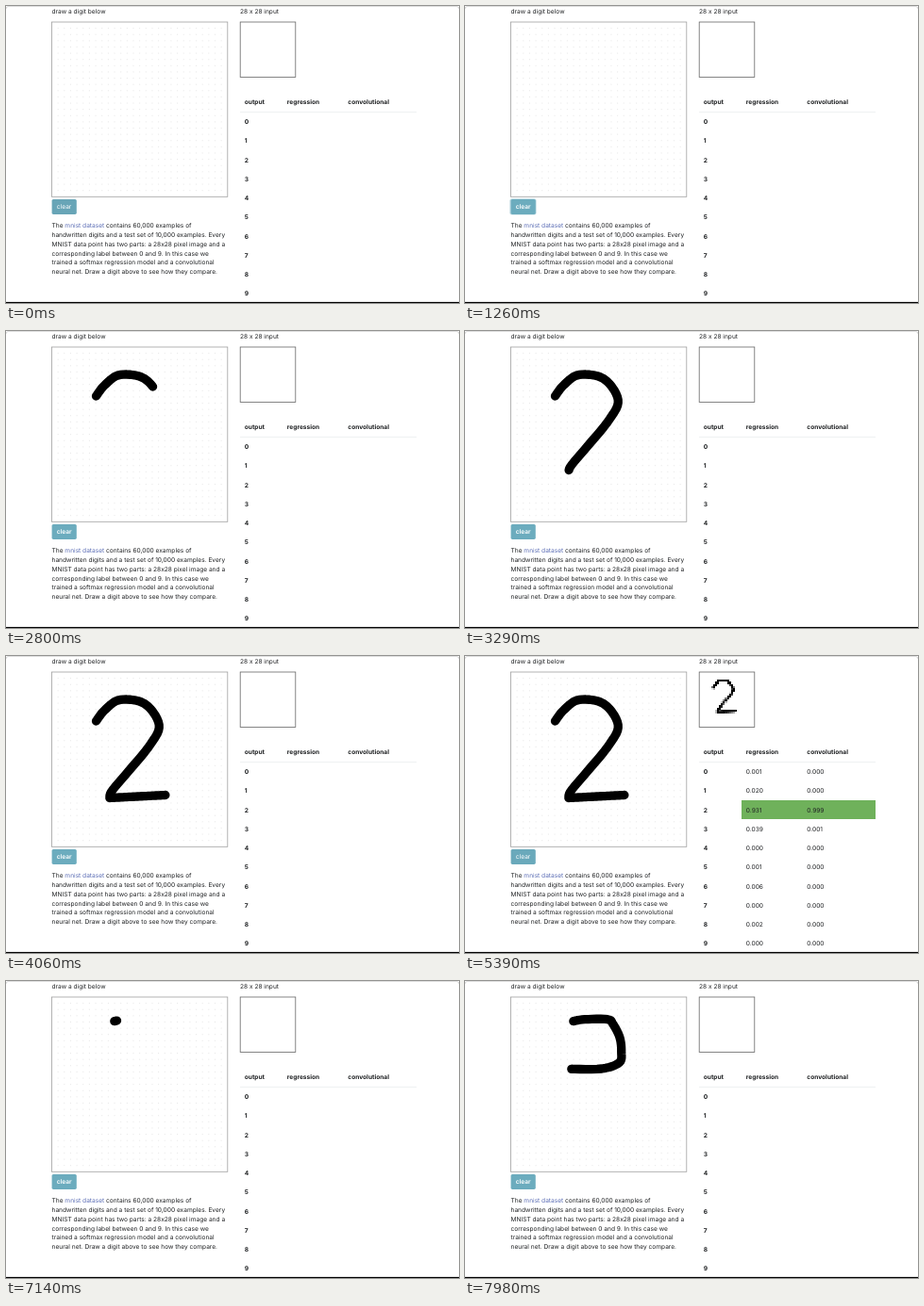
Recreate the animation shown at these times as an HTML page. Size 480 px wide and 315 px high, loop 8000 ms.

```html
<!DOCTYPE html>
<html lang="en">
<head>
<meta charset="utf-8">
<title>Digit recognition demo</title>
<style>
  html, body { margin: 0; width: 100%; height: 100%; overflow: hidden; background: #fff; }
  svg { display: block; width: 100vw; height: 100vh; }
  text { font: 6.6px Inter, "Open Sans", sans-serif; fill: #1f2123; text-rendering: geometricPrecision; }
  .bold { font-weight: 650; }
</style>
</head>
<body>
<svg id="stage" viewBox="0 0 480 315"></svg>
<script>
const NS = 'http://www.w3.org/2000/svg';
const stage = document.getElementById('stage');
const LOOP = 8000, TICK = 70;
const PAD = { x: 48.5, y: 17, w: 186.3, h: 185.3 };
const MINI = { x: 248.2, y: 17, w: 58.6, h: 58.4 };
const CELLS = 28, BRUSH = 9.3, ROW = 20.24;

// Moments of the demo, in ticks
const LEAVE = 17, DRAW = 34, PREDICT = 59, ENTER = 77, CLEAR = 83, LEAVE_AGAIN = 87, REDRAW = 102;

function add(tag, attrs, parent = stage) {
  const el = document.createElementNS(NS, tag);
  for (const key in attrs) el.setAttribute(key, attrs[key]);
  parent.appendChild(el);
  return el;
}
function label(x, y, content, cls = '', parent = stage) {
  const el = add('text', { x, y, class: cls }, parent);
  el.textContent = content;
  return el;
}
function box(r, attrs, parent = stage) {
  return add('rect', { x: r.x, y: r.y, width: r.w, height: r.h, ...attrs }, parent);
}
const show = (el, on) => el.setAttribute('visibility', on ? 'visible' : 'hidden');
const within = (t, from, to) => t >= from && t < to;

// Each stroke is a spline through points evenly spaced in time
const two = [
  { from: DRAW, to: 48, points: [
    [95.5, 69], [105, 57], [121, 46.4], [147, 50.7], [162.2, 73],
    [152.5, 94.5], [129.5, 122.5], [112.3, 143], [109.8, 150.5]] },
  { from: 49, to: 57, points: [[109.8, 150.5], [168.9, 147.5]] }
];
const next = [
  { from: REDRAW - .5, to: 113.5, points: [
    [114.8, 42.6], [127, 40.7], [151, 40.7], [157, 46], [164, 60],
    [165.7, 75], [163.5, 86.5], [145, 93], [112.8, 93.4]] }
];

function splineAt(points, u) {
  const last = points.length - 1;
  const i = Math.min(Math.floor(u), last - 1), k = u - i;
  const at = n => points[Math.max(0, Math.min(last, n))];
  return [0, 1].map(axis => {
    const [a, b, c, d] = [-1, 0, 1, 2].map(n => at(i + n)[axis]);
    return b + k / 2 * (c - a + k * (2 * a - 5 * b + 4 * c - d + k * (3 * (b - c) + d - a)));
  });
}

function trace(strokes, tick) {
  const out = [];
  for (const { from, to, points } of strokes) {
    const end = Math.min(tick, to);
    for (let t = from; t <= end; t += .25) {
      out.push(splineAt(points, (t - from) / (to - from) * (points.length - 1)));
    }
  }
  return out;
}

function distance(points, x, y) {
  return Math.min(...points.map(p => Math.hypot(p[0] - x, p[1] - y)));
}

// Window edges
add('path', { d: 'M0 3Q0 .4 3 .4H477Q480 .4 480 3', fill: 'none', stroke: '#ccc', 'stroke-width': .7 });
box({ x: 0, y: 313.9, w: 480, h: 1.1 }, { fill: '#000' });

// Drawing pad
label(48.5, 7.8, 'draw a digit below');
const step = { x: PAD.w / CELLS, y: PAD.h / CELLS };
let dots = '';
for (let row = 1; row < CELLS; row++) {
  for (let col = 1; col < CELLS; col++) {
    dots += `M${PAD.x + col * step.x - .5} ${PAD.y + row * step.y}h1`;
  }
}
add('path', { d: dots, stroke: '#e4e4e4', 'stroke-width': .9 });
box(PAD, { fill: 'none', stroke: '#a0a0a0', 'stroke-width': .8 });
const pen = add('path', {
  fill: 'none', stroke: '#000', 'stroke-width': BRUSH, 'stroke-linecap': 'round', 'stroke-linejoin': 'round'
});

// Button
const ring = add('rect', { x: 47.4, y: 204.2, width: 28.2, height: 17.4, rx: 2.4, fill: '#bbd9e1' });
const button = add('rect', { x: 48.6, y: 205, width: 26.2, height: 15.9, rx: 1.6 });
const clear = label(61.6, 215.2, 'clear');
clear.setAttribute('text-anchor', 'middle');
clear.style.fill = '#fff';

// Description
const copy = [
  ' contains 60,000 examples of',
  'handwritten digits and a test set of 10,000 examples. Every',
  'MNIST data point has two parts: a 28x28 pixel image and a',
  'corresponding label between 0 and 9. In this case we',
  'trained a softmax regression model and a convolutional',
  'neural net. Draw a digit above to see how they compare.'
];
copy.forEach((line, i) => {
  const el = label(48.5, 234.7 + i * 9.94, i ? line : 'The ');
  if (i) return;
  add('tspan', { fill: '#5b6db5' }, el).textContent = 'mnist dataset';
  add('tspan', {}, el).textContent = line;
});

// Input preview
label(248, 7.8, '28 x 28 input');
box(MINI, { fill: 'none', stroke: '#666', 'stroke-width': .8 });
const result = add('g', {});
const cell = { w: MINI.w / CELLS, h: MINI.h / CELLS };
const drawn = trace(two, PREDICT);
for (let row = 0; row < CELLS; row++) {
  for (let col = 0; col < CELLS; col++) {
    const d = distance(drawn, PAD.x + (col + .5) * step.x, PAD.y + (row + .5) * step.y);
    const ink = Math.min(1, (BRUSH / 2 - d) / 2.5 + .5);
    if (ink > 0) {
      box({ x: MINI.x + col * cell.w, y: MINI.y + row * cell.h, ...cell },
        { 'fill-opacity': ink.toFixed(2), 'shape-rendering': 'crispEdges' }, result);
    }
  }
}

// Results table; digits not listed score zero
const columns = [
  { x: 252.8, head: 'output' },
  { x: 297.8, head: 'regression', scores: { 0: .001, 1: .02, 2: .931, 3: .039, 5: .001, 6: .006, 8: .002 } },
  { x: 362.3, head: 'convolutional', scores: { 2: .999, 3: .001 } }
];
box({ x: 248, y: 112, w: 187, h: .8 }, { fill: '#eceeef' });
box({ x: 293, y: 153, w: 142, h: 20 }, { fill: '#6fb15b' }, result);
for (const { x, head, scores } of columns) {
  label(x, 104.4, head, 'bold');
  for (let digit = 0; digit < 10; digit++) {
    const y = 125.2 + digit * ROW;
    if (scores) label(x, y, (scores[digit] || 0).toFixed(3), '', result);
    else label(x, y, digit, 'bold');
  }
}

function render(ms) {
  const tick = Math.floor((ms % LOOP) / TICK + 1e-6);
  const changing = [LEAVE, ENTER, LEAVE_AGAIN].includes(tick);
  const hover = changing ? .5 : tick < LEAVE || within(tick, ENTER, LEAVE_AGAIN) ? 1 : 0;
  button.setAttribute('fill', `rgb(${108 - 4 * hover},${172 - 7 * hover},${190 - 7 * hover})`);
  clear.style.fontWeight = hover ? 400 : 600;
  show(ring, within(tick, LEAVE, DRAW) || within(tick, CLEAR, REDRAW));
  show(result, within(tick, PREDICT, CLEAR));
  const points = trace(tick < CLEAR ? two : next, tick);
  pen.setAttribute('d', points.length ? `M${points.join('L')}h.01` : '');
}

const start = performance.now();
function loop() {
  render(performance.now() - start);
  requestAnimationFrame(loop);
}
render(0);
requestAnimationFrame(loop);
</script>
</body>
</html>
```
